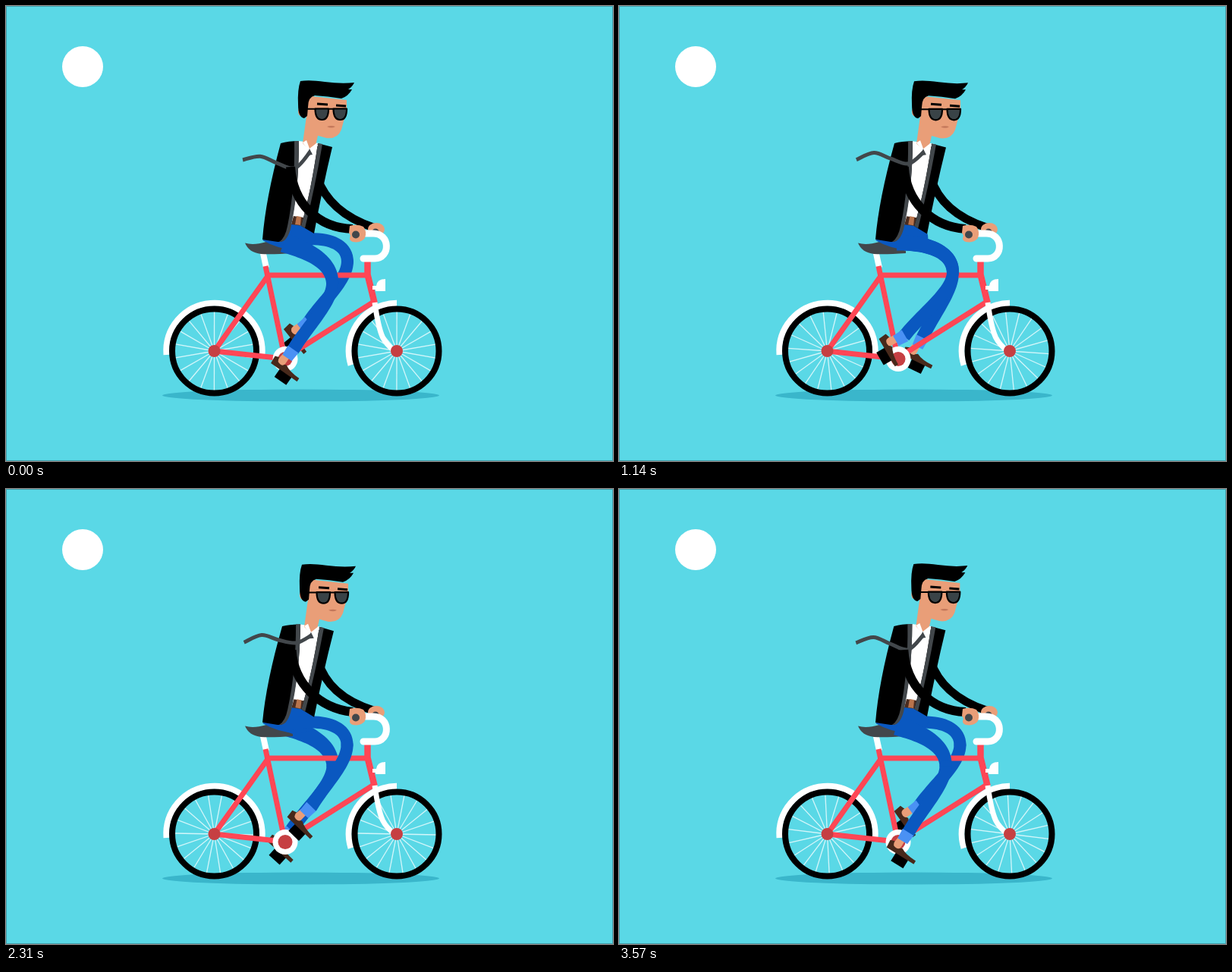
Recreate the animation shown at these times as an HTML page with a canvas. Size 800 px wide and 600 px high, loop 3600 ms.

```html
<!DOCTYPE html>
<html lang="en">
<head>
<meta charset="utf-8">
<title>Cyclist</title>
<style>
  html, body { margin: 0; width: 100%; height: 100%; overflow: hidden; background: #5ad8e6; }
  canvas { display: block; }
</style>
</head>
<body>
<canvas id="stage" width="800" height="600"></canvas>
<script>
const ctx = document.getElementById('stage').getContext('2d');
const LOOP = 3600, TAU = Math.PI * 2, RAD = Math.PI / 180;
const SKY = '#5ad8e6', RED = '#ff4655', HUB = '#c63f42', BLUE = '#0a58c0', CUFF = '#4a91f4';
const SKIN = '#e99e78', SHOE = '#48291b', GREY = '#42474b', BLACK = '#000', WHITE = '#fff';
const HIP = [366, 312], PIVOT = [360, 308], NECK = [401, 182];

function fill(d, color) {
  ctx.fillStyle = color;
  ctx.fill(new Path2D(d));
}
function line(d, color, width, cap = 'butt') {
  ctx.strokeStyle = color;
  ctx.lineWidth = width;
  ctx.lineCap = cap;
  ctx.lineJoin = 'round';
  ctx.stroke(new Path2D(d));
}
function oval(x, y, rx, color, ry = rx) {
  ctx.fillStyle = color;
  ctx.beginPath();
  ctx.ellipse(x, y, rx, ry, 0, 0, TAU);
  ctx.fill();
}
function ring(x, y, r, color, width, from = 0, to = TAU) {
  ctx.strokeStyle = color;
  ctx.lineWidth = width;
  ctx.lineCap = 'butt';
  ctx.beginPath();
  ctx.arc(x, y, r, from, to);
  ctx.stroke();
}
function group(draw) {
  ctx.save();
  draw();
  ctx.restore();
}
function rotate([x, y], [cx, cy], a) {
  const c = Math.cos(a), s = Math.sin(a);
  return [cx + (x - cx) * c - (y - cy) * s, cy + (x - cx) * s + (y - cy) * c];
}
const mix = (a, b, t) => a + (b - a) * t;

// Cubic curve whose width runs from w0 to w1
function limb(p0, p1, p2, p3, w0, w1, color) {
  const at = t => [0, 1].map(k => {
    const u = 1 - t;
    return u * u * u * p0[k] + 3 * u * u * t * p1[k] + 3 * u * t * t * p2[k] + t * t * t * p3[k];
  });
  const left = [], right = [];
  for (let i = 0; i <= 24; i++) {
    const t = i / 24, [x, y] = at(t), a = at(t - 0.01), b = at(t + 0.01);
    const dx = b[0] - a[0], dy = b[1] - a[1], k = mix(w0, w1, t) / 2 / Math.hypot(dx, dy);
    left.push([x - dy * k, y + dx * k]);
    right.unshift([x + dy * k, y - dx * k]);
  }
  fill('M' + left.concat(right).join('L') + 'Z', color);
}

function leg(angle, ox, oy) {
  const foot = [371 + ox + 22 * Math.cos(angle), 469 + oy + 20.5 * Math.sin(angle)];
  const tilt = (43 + 18 * Math.cos(angle - 220 * RAD)) * RAD;
  const lift = Math.cos(angle - 290 * RAD);
  const knee = [440 + 10 * lift, 351.5 - 14.5 * lift];
  const [rx, ry] = rotate([-10, -35], [0, 0], tilt);
  const ankle = [foot[0] + rx, foot[1] + ry];
  const onFoot = paint => group(() => {
    ctx.translate(...foot);
    ctx.rotate(tilt);
    paint();
  });

  onFoot(() => {
    fill('M-10 -6H9V7H-10Z', BLACK);
    fill('M-25 -16L-19 -18Q-14 -9 -6 -15Q2 -10 18 -10V-5H-24Z', SHOE);
    fill('M-18 -25H-8V-16Q-8 -11 -13 -11Q-19 -11 -19 -17Z', SKIN);
  });
  limb(HIP, [404 + 6 * lift, 312 - 11 * lift], [knee[0], knee[1] - 29], knee, 21 - 5 * lift, 16, BLUE);
  oval(...knee, 8, BLUE);
  limb(knee, [knee[0], knee[1] + 25],
    [mix(ankle[0], knee[0], 0.35), mix(ankle[1], knee[1], 0.35)], ankle, 16, 17, BLUE);
  onFoot(() => fill('M-19 -37H-2L-3 -23H-18Z', CUFF));
}

function wheel(x, turn) {
  const y = 455;
  for (let i = 0; i < 18; i++) {
    const a = turn + i * 20 * RAD - TAU / 4;
    line(`M${x} ${y}L${x + 52 * Math.cos(a)} ${y + 52 * Math.sin(a)}`, '#d4f6fa', 1.3);
  }
  ring(x, y, 55.5, BLACK, 8);
}

function bike(turn) {
  ring(274.5, 455, 63.2, WHITE, 8, 175.5 * RAD, 365 * RAD);
  ring(515, 455, 63.2, WHITE, 8, 163 * RAD, 270 * RAD);
  wheel(274.5, turn);
  wheel(515, turn);
  line('M338 322L343 345', WHITE, 8);
  line('M342 343L367 462', RED, 7);
  line('M343 355H480M345 356L274.5 455L366 465L488 388', RED, 7);
  line('M476.5 337V354L485.5 391', RED, 8.5);
  line('M486 391Q490.5 424 496.5 437Q501 446 511 454', WHITE, 7);
  oval(274.5, 455, 8, HUB);
  oval(515, 455, 8, HUB);
  fill('M483 369H488Q489 360 500 360V376H487V374H483Z', WHITE);
  fill('M315 312.5Q326 316 343 311L378 323V326Q350 328 336 327Q320 325 315 312.5Z', GREY);
  oval(368, 465.5, 16.5, WHITE);
  oval(368, 465.5, 9.5, HUB);
}

function torso() {
  fill('M385 178L413 181L411 210L393 290L374 287Z', WHITE);
  fill('M379 277L393 279L391 290L376 288Z', '#4a2c1f');
  fill('M383 277L389 278L388 289L381 288Z', '#b9744c');
  fill('M362 181Q372 178 386 178Q386 245 374 294Q370 312 358 311L338 308Q342 255 362 181Z', BLACK);
  fill('M380 178H386Q386 245 375 294Q370 312 360 311Q368 306 371 290Q381 242 380 178Z', GREY);
  fill('M411 181L430 186Q417 240 406 300L389 290Q402 245 411 181Z', BLACK);
  fill('M411 181L417 182Q407 240 394 293L389 290Q402 245 411 181Z', GREY);
}

function head() {
  oval(388.5, 139, 3.5, '#e88a67', 6);
  fill('M394 118L449 124V137L442 163Q437 176 422 174L411 171L408 184L400 190L391 181L396 145Z', SKIN);
  fill('M391 180L396 177L400 188L409 181L411 184L402 195Z', WHITE);
  fill('M393 148Q385 147 385 130Q384 110 388 99Q400 97 420 100Q442 103 459 101Q456 107 451 110L456 110'
    + 'Q451 119 442 122Q424 119 407 118Q398 120 398 133L397 145Z', BLACK);
  line('M410 129L424 130M435 131L448 132', BLACK, 3);
  line('M396 135.8H449', BLACK, 2);
  for (const x of [407.5, 431.5]) {
    const d = `M${x} 135.5H${x + 17.5}Q${x + 17.5} 150 ${x + 9} 150Q${x} 150 ${x} 135.5Z`;
    fill(d, '#394347');
    line(d, BLACK, 2.2);
  }
  fill('M423 159Q429 157 434 159Q429 162 423 159Z', '#c3775a');
}

// Travelling wave through three points between the knot and the loose end
function tie(phase) {
  const wave = (mean, size, lag) => mean + size * Math.cos(phase - lag * RAD);
  const pts = [
    [401, 192],
    [381, 195 + wave(4, 12, 15) + 3 * Math.cos(2 * phase)],
    [357, 198 + wave(9, 10, 90)],
    [335, 200 + wave(5, 12, 125)],
    [312, 203]
  ];
  let d = 'M' + pts[0];
  for (let i = 0; i < 4; i++) {
    const a = pts[i], b = pts[i + 1], before = pts[i - 1] || a, after = pts[i + 2] || b;
    const c1 = a.map((v, k) => v + (b[k] - before[k]) / 6);
    const c2 = b.map((v, k) => v - (after[k] - a[k]) / 6);
    d += `C${c1} ${c2} ${b}`;
  }
  line(d, GREY, 5);
  fill('M400 188L404 196L396 197Z', GREY);
}

function draw(ms) {
  const t = ms % LOOP / LOOP;
  const crank = 103 * RAD + t * 4 * TAU;
  const beat = t * 6 * TAU;
  const sway = (1 - Math.cos(beat - 6 * RAD)) / 2;
  const lean = sway * 8.4 / 128;
  const inBody = p => rotate(p, PIVOT, lean);
  const leaning = paint => group(() => {
    ctx.translate(...PIVOT);
    ctx.rotate(lean);
    ctx.translate(-PIVOT[0], -PIVOT[1]);
    paint();
  });

  ctx.fillStyle = SKY;
  ctx.fillRect(0, 0, 800, 600);
  oval(101, 80, 27, WHITE);
  oval(388.5, 513.5, 182.5, '#3ab6cb', 8);

  const farShoulder = inBody([410, 226]);
  line(`M${farShoulder}C${mix(422, 421, sway)} ${mix(261, 273, sway)} 452 ${mix(281, 285, sway)} 484 292`, BLACK, 11);
  oval(488, 294.5, 11, SKIN, 8.5);
  oval(487, 298, 4.5, GREY);
  leg(crank + Math.PI, 1, -1);
  bike(t * TAU);
  line('M470 300H483C507 299 507 333 486 333H471', WHITE, 9, 'round');

  fill('M338 309L374 288Q403 287 407 302Q409 311 401 319Q370 327 338 309Z', BLUE);
  leg(crank, 0, 0);
  leaning(torso);
  group(() => {
    const n = inBody(NECK);
    ctx.translate(n[0] - NECK[0], n[1] - NECK[1]);
    head();
  });
  leaning(() => tie(beat));

  const shoulder = inBody([375, 212]);
  line(`M${shoulder}C${mix(378, 383, sway)} ${mix(260, 246, sway)} ${mix(411, 419, sway)} ${mix(293, 277, sway)} 457 294`, BLACK, 12);
  fill('M453 290Q463 287 471 291Q476 297 473 306Q468 313 457 311Q451 309 454 303L452 299Z', SKIN);
  oval(461, 301.5, 5, GREY);

  ctx.strokeStyle = '#479da8';
  ctx.lineWidth = 1;
  ctx.strokeRect(0.5, 0.5, 799, 599);
}

function tick() {
  draw(performance.now());
  requestAnimationFrame(tick);
}
tick();
</script>
</body>
</html>
```
